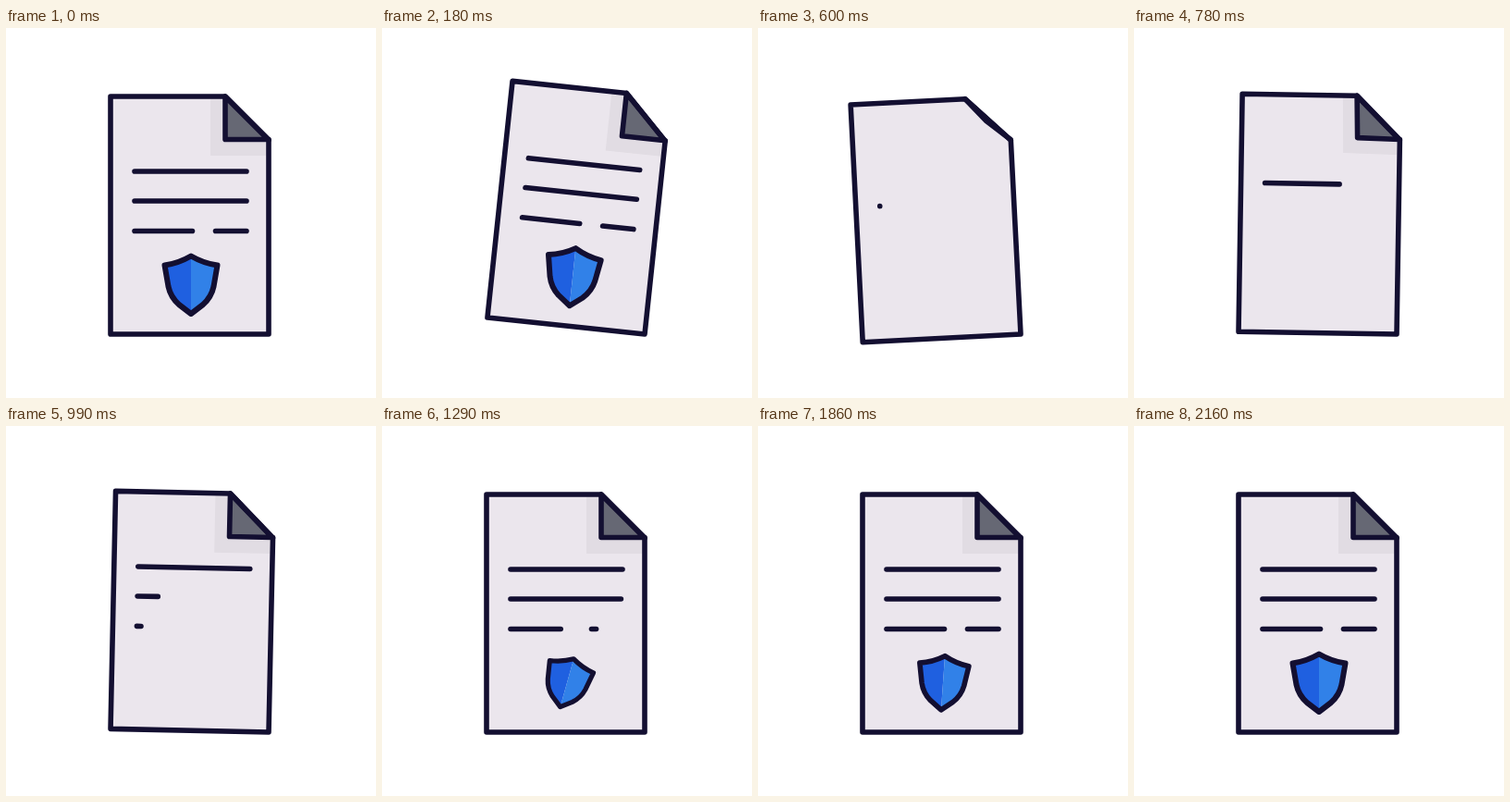
These frames come from a looping animation (400x400 px, 4400 ms). An HTML page:

```html
<!DOCTYPE html>
<html lang="en">
<head>
<meta charset="utf-8">
<title>Protected document</title>
<style>
  html, body { margin: 0; width: 100%; height: 100%; overflow: hidden; background: #fff; }
  svg { display: block; width: 100%; height: 100%; }
  .ink { stroke: #130f31; stroke-width: 5.6; stroke-linejoin: round; stroke-linecap: round; }
</style>
</head>
<body>
<svg viewBox="0 0 400 400">
  <defs>
    <clipPath id="sheet"><path d="M113 74H237L284 121V331H113Z"/></clipPath>
  </defs>
  <g id="page">
    <path d="M113 74H237L284 121V331H113Z" fill="#ebe6ed"/>
    <path id="shade" fill="#e1dce3" clip-path="url(#sheet)"/>
    <g id="lines" class="ink" fill="none">
      <path/><path/><path/><path/>
    </g>
    <g id="shield">
      <path d="M200 246.5C191.500 251.500 182 255 171.500 256.500L175.500 279.500Q178 291 187 299L200 309Z" fill="#1f60e0"/>
      <path d="M200 246.500C208.500 251.500 218 255 228.500 256.500L224.500 279.500Q222 291 213 299L200 309Z" fill="#3181e8"/>
      <path class="ink" style="stroke-width:6" fill="none" d="M200 246.500C208.500 251.500 218 255 228.500 256.500L224.500 279.500Q222 291 213 299L200 309L187 299Q178 291 175.500 279.500L171.500 256.500C182 255 191.500 251.500 200 246.500Z"/>
    </g>
    <path id="flap" class="ink"/>
    <path class="ink" fill="none" d="M113 74H237L284 121V331H113Z"/>
  </g>
</svg>
<script>
const LOOP = 4400, TURNED = 552;
const $ = id => document.getElementById(id);
const page = $('page'), shade = $('shade'), flap = $('flap'), shield = $('shield');
const strokes = [...$('lines').children];

// x1, x2, y, draw start, draw end
const LINES = [
  [139, 260, 155, 600, 898],
  [139, 260, 187, 860, 1325],
  [139, 201.5, 219.5, 902, 1412],
  [226.5, 260, 219.5, 1161, 1671]
];
const SWING = [[0, 0], [238, 7], [TURNED, -3.2], [880, 2], [1140, 0]];
const TILT = [[1050, 0], [1290, 15.7], [1590, -8], [1860, 4], [2130, 0]];
const SIZE = [[1050, 0], [1290, .86], [1590, .865], [2130, 1]];
const GREY = [102, 104, 116], PAPER = [233, 229, 235];

const mix = (a, b, k) => a + (b - a) * k;
function ease(t, from, to) {
  const k = Math.min(1, Math.max(0, (t - from) / (to - from)));
  return (1 - Math.cos(Math.PI * k)) / 2;
}
function track(keys, t) {
  let v = keys[0][1];
  for (let i = 1; i < keys.length; i++) {
    if (t >= keys[i - 1][0]) v = mix(keys[i - 1][1], keys[i][1], ease(t, keys[i - 1][0], keys[i][0]));
  }
  return v;
}

function drawFold(t, fresh) {
  const turn = fresh ? 0 : ease(t, 240, TURNED);
  const grow = fresh ? ease(t, TURNED, 820) : 1;
  const top = mix(237, 113, turn), side = mix(121, 331, turn);
  const x = top + 23.5 * (1 - grow), y = side - 23.5 * (1 - grow);
  const dx = 16 * grow, dy = 17 * grow;
  const tint = fresh ? 0 : ease(t, 240, 430);
  flap.setAttribute('d', `M237 74L${top} 74L${x} ${y - .5 * (1 - turn)}L284 ${side - .5 * (1 - turn)}V121Z`);
  flap.setAttribute('fill', `rgb(${GREY.map((c, i) => Math.round(mix(c, PAPER[i], tint)))})`);
  shade.setAttribute('d', `M237 74L${top - dx} 74L${x - dx} ${y + dy}L284 ${side + dy}V121Z`);
}

function drawLines(t, fresh) {
  const slide = fresh ? 30 * (1 - ease(t, 600, 960)) : 0;
  LINES.forEach(([x1, x2, y, from, to], i) => {
    const k = fresh ? ease(t, from, to) : 1;
    strokes[i].style.display = k > 0 ? '' : 'none';
    strokes[i].setAttribute('d', `M${x1} ${y + slide}H${mix(x1, x2, k)}`);
  });
}

function drawShield(t, fresh) {
  const size = fresh ? track(SIZE, t) : 1;
  const tilt = fresh ? track(TILT, t) : 0;
  shield.style.display = size > 0 ? '' : 'none';
  shield.setAttribute('transform', `translate(200 277.7) rotate(${tilt}) scale(${size}) translate(-200 -277.7)`);
}

function draw(t) {
  const fresh = t >= TURNED;
  page.setAttribute('transform', `rotate(${track(SWING, t)} 284 331)`);
  drawFold(t, fresh);
  drawLines(t, fresh);
  drawShield(t, fresh);
}

const start = performance.now();
function tick() {
  draw((performance.now() - start) % LOOP);
  requestAnimationFrame(tick);
}
tick();
</script>
</body>
</html>
```
